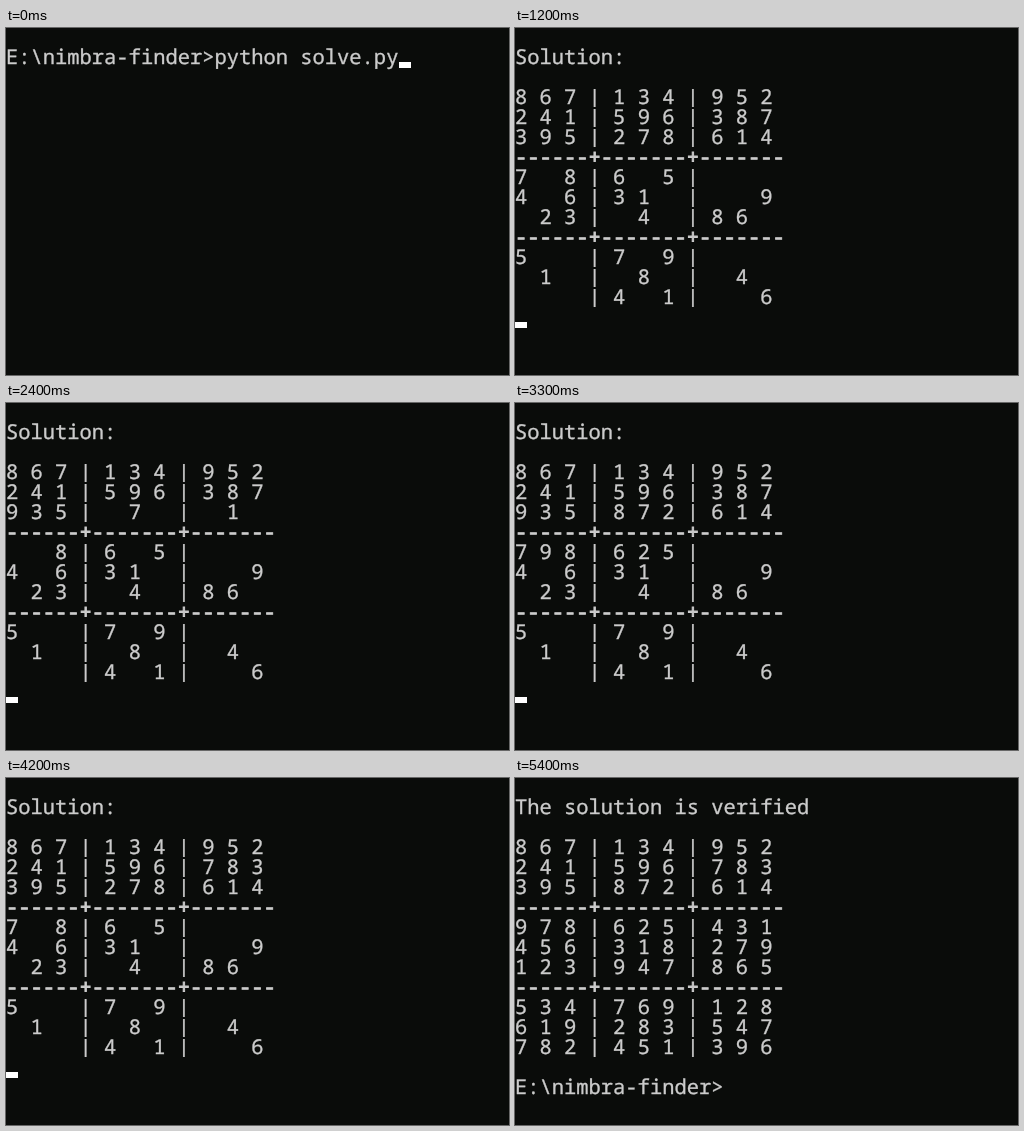
Animation of 503 by 347 pixels, one loop 5700 ms. Source, as an HTML page:

```html
<!DOCTYPE html>
<html lang="en">
<head>
<meta charset="utf-8">
<title>Grid solver</title>
<style>
  html, body { margin: 0; width: 100%; height: 100%; overflow: hidden; background: #0a0c0a; }
  pre {
    position: absolute; left: 0; top: 18px; margin: 0;
    font: 20.45px/20px "Noto Sans Mono", "DejaVu Sans Mono", monospace;
    font-variant-ligatures: none; text-rendering: geometricPrecision;
    color: #ccc; -webkit-text-stroke: .35px #ccc;
  }
  /* heavier rules and shorter bars, as in a console face */
  b { font-weight: inherit; -webkit-text-stroke-width: .9px; }
  i { font-style: normal; display: inline-block; clip-path: inset(3px 0 -1px); }
  #cursor { position: absolute; width: 12px; height: 6px; background: #fff; }
</style>
</head>
<body>
<pre id="screen"></pre>
<div id="cursor"></div>
<script>
const LOOP = 5700, CELL_W = 12.27, LINE_H = 20;
const PROMPT = "E:\\nimbra-finder>";
const puzzle = [
  "8..1349.2", ".41.96.8.", "..5.7..1.",
  "..86.5...", "4.631...9", ".23.4.86.",
  "5..7.9...", ".1..8..4.", "...4.1..6"
].join("");

// Backtracking search that keeps the board after every placement.
function solve(start) {
  const board = [...start], trace = [];
  const fits = (pos, d) => {
    const r = Math.floor(pos / 9), c = pos % 9;
    const top = r - r % 3, left = c - c % 3;
    for (let i = 0; i < 9; i++) {
      if (board[r * 9 + i] === d || board[i * 9 + c] === d) return false;
      if (board[(top + Math.floor(i / 3)) * 9 + left + i % 3] === d) return false;
    }
    return true;
  };
  const fill = pos => {
    while (pos < 81 && board[pos] !== ".") pos++;
    if (pos === 81) return true;
    for (const d of "123456789") {
      if (!fits(pos, d)) continue;
      board[pos] = d;
      trace.push(board.join(""));
      if (fill(pos + 1)) return true;
      board[pos] = ".";
    }
    return false;
  };
  fill(0);
  return trace;
}

function grid(board) {
  const lines = [];
  for (let r = 0; r < 9; r++) {
    if (r === 3 || r === 6) lines.push("<b>------+-------+-------</b>");
    const row = board.slice(r * 9, r * 9 + 9).replace(/\./g, " ");
    lines.push(row.match(/.{3}/g).map(part => [...part].join(" ")).join(" <i>|</i> "));
  }
  return lines.join("\n");
}

const trace = solve(puzzle);
const last = trace.length - 1;
const stepOf = head => trace.indexOf(head + puzzle.slice(head.length));

// [time, position in the search]
const keys = [
  [1200, stepOf("867134952" + "241596387" + "395278614" + "7")],
  [2400, stepOf("867134952" + "241596387" + "935")],
  [3300, stepOf("867134952" + "241596387" + "935872614" + "798625")],
  [4200, stepOf("867134952" + "241596783" + "395278614" + "7")],
  [5100, last]
];

function boardAt(t) {
  const i = keys.findIndex(([end], n) => n > 0 && t < end);
  const [t0, s0] = keys[i - 1], [t1, s1] = keys[i];
  return trace[Math.round(s0 + (s1 - s0) * (t - t0) / (t1 - t0))];
}

const page = (title, board, foot = "") => `${title}\n\n${grid(board)}\n\n${foot}`;

// Markup and cursor cell [column, line] for a given time.
function view(t) {
  if (t < 300) {
    const text = PROMPT + "python solve.py";
    return [text, [text.length, 0]];
  }
  if (t < 1200) {
    const ask = "Press Enter to See the Solution...";
    return [page("Problem:", puzzle, ask), t < 600 ? [ask.length, 14] : null];
  }
  if (t < 5100) return [page("Solution:", boardAt(t)), [0, 13]];
  return [page("The solution is verified", trace[last], PROMPT), null];
}

const screenEl = document.getElementById("screen");
const cursorEl = document.getElementById("cursor");
let shown = -1;

function draw() {
  const tick = Math.floor(performance.now() % LOOP / 300);
  if (tick !== shown) {
    shown = tick;
    const [markup, cursor] = view(tick * 300);
    screenEl.innerHTML = markup;
    cursorEl.hidden = !cursor;
    if (cursor) {
      cursorEl.style.left = Math.round(cursor[0] * CELL_W) + "px";
      cursorEl.style.top = 34 + cursor[1] * LINE_H + "px";
    }
  }
  requestAnimationFrame(draw);
}
draw();
</script>
</body>
</html>
```
